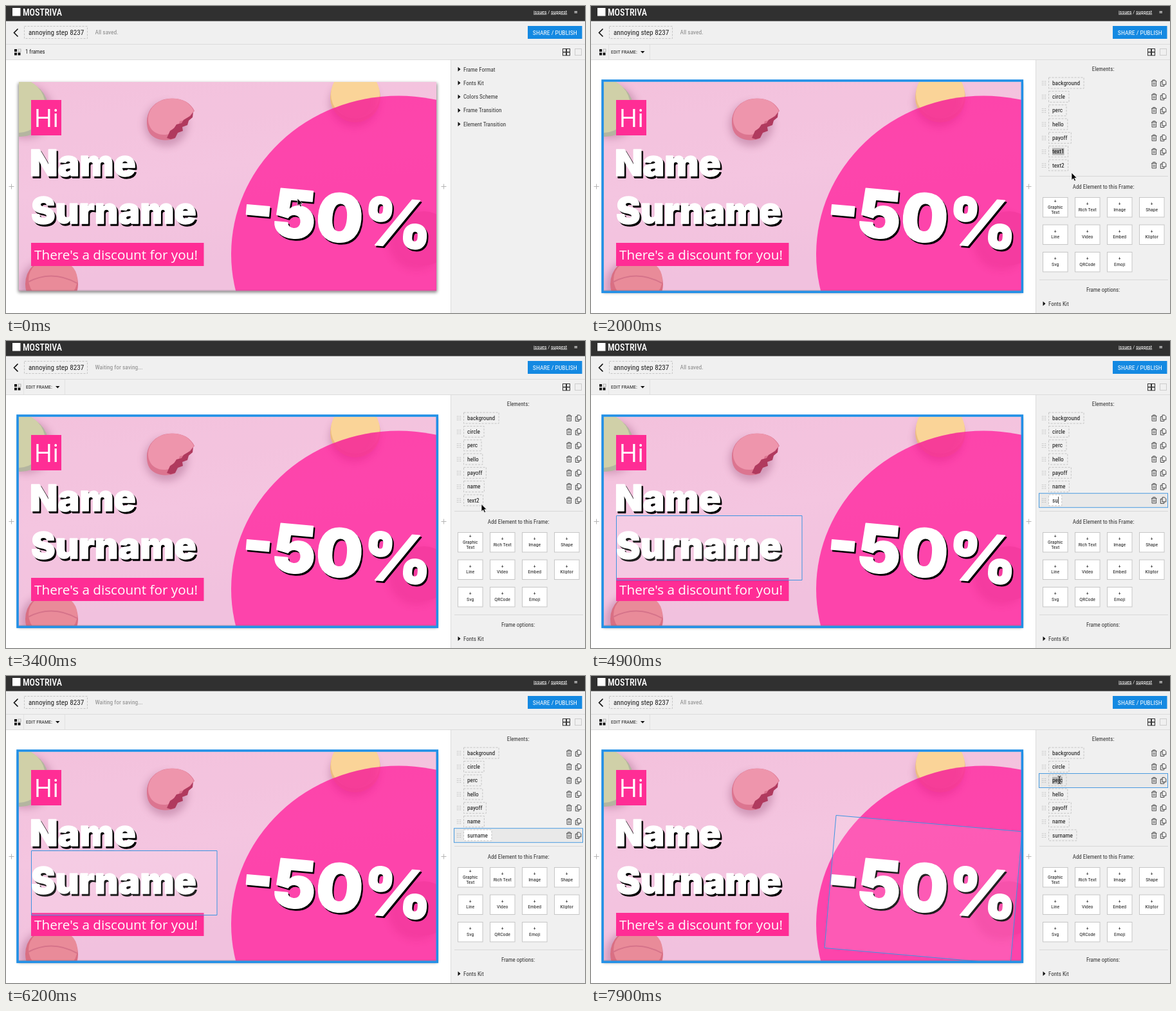
These frames come from a looping animation (900x477 px, 8 s). An HTML page:

```html
<!DOCTYPE html>
<html lang="en">
<head>
<meta charset="utf-8">
<title>Slide editor</title>
<style>
html, body { margin: 0; width: 100%; height: 100%; overflow: hidden; background: #fff; }
svg { display: block; width: 900px; height: 477px; font-family: "Roboto Condensed", Roboto, sans-serif; font-stretch: 75%; }
.slide { font-family: "Open Sans", sans-serif; font-stretch: 100%; font-weight: 500; fill: #fff; }
.bold { font-family: Inter, sans-serif; font-stretch: 100%; font-weight: 900; stroke-width: 1.5; stroke-linejoin: round; }
.dash { stroke: #c4c4c4; stroke-dasharray: 3 2; }
</style>
</head>
<body>
<svg id="stage" viewBox="0 0 900 477">
  <defs>
    <clipPath id="slideClip"><rect x="20" y="118" width="649" height="324.5"/></clipPath>
    <clipPath id="circleClip"><ellipse cx="610" cy="385.4" rx="260" ry="246"/></clipPath>
    <linearGradient id="pinkBack" x2=".3" y2="1">
      <stop offset="0" stop-color="#f8c3de"/><stop offset=".5" stop-color="#f9c8e3"/><stop offset="1" stop-color="#f4c2e0"/>
    </linearGradient>
    <filter id="blur" x="-50%" y="-50%" width="200%" height="200%"><feGaussianBlur stdDeviation="6"/></filter>
    <filter id="soft" x="-5%" y="-5%" width="110%" height="115%"><feGaussianBlur stdDeviation="2.5"/></filter>
  </defs>
  <rect width="900" height="477" fill="#fff"/>
  <g id="chrome"></g>
  <g id="slide">
    <rect x="19" y="120" width="651" height="325" fill="#000" opacity=".5" filter="url(#soft)"/>
    <rect x="20" y="118" width="649" height="324.5" fill="#fff"/>
    <g clip-path="url(#slideClip)">
      <g id="photo">
        <rect x="20" y="118" width="649" height="325" fill="url(#pinkBack)"/>
        <rect id="tint" x="20" y="118" width="649" height="325" fill="#e6bcd8" opacity=".3"/>
        <g fill="#a8688c" opacity=".45" filter="url(#blur)">
          <circle cx="31" cy="164" r="42"/><circle cx="249" cy="184" r="34"/>
          <circle cx="541" cy="151" r="38"/><circle cx="62" cy="435" r="40"/>
        </g>
        <circle cx="23" cy="160" r="43" fill="#b4b5a0"/>
        <circle cx="19" cy="155" r="42" fill="#d0d0a8"/>
        <path d="M293 163C285 146 265 140 243 146C222 154 215 174 221 193C226 207 246 212 262 206L264 198L272 192L270 186L280 182L283 174Z" fill="#dc7590"/>
        <path d="M292 163C284 146 265 140 244 146C224 153 217 172 223 186C228 199 244 203 256 198L260 190L268 186L270 179L280 177Z" fill="#ee95ac"/>
        <path d="M250 205l5-11 6-4 4-6 8-2 3-5 10-6 5-6-1 8-6 5-2 7-8 3 1 6-8 3-4 8-7 2z" fill="#b03a5e"/>
        <circle cx="543" cy="142" r="39" fill="#ecbc80"/>
        <circle cx="543" cy="137" r="38" fill="#fad498"/>
        <circle cx="71" cy="432" r="41" fill="#d96f83"/>
        <ellipse cx="73" cy="425" rx="38" ry="33" fill="#e98b99"/>
        <path d="M34 429Q72 409 111 431" fill="none" stroke="#d5738a" stroke-width="2"/>
      </g>
      <ellipse id="circle" cx="610" cy="385.4" rx="260" ry="246"/>
      <g id="veil" clip-path="url(#circleClip)">
        <circle cx="638" cy="366" r="44" filter="url(#blur)"/><circle cx="650" cy="361" r="42"/>
        <circle cx="541" cy="148" r="38" filter="url(#blur)"/>
      </g>
      <g id="words">
        <rect x="39" y="146" width="47" height="55" fill="#ff2d95"/>
        <text class="slide" x="43.5" y="188" font-size="39">Hi</text>
        <rect x="39" y="368" width="268.5" height="36" fill="#ff2d95"/>
        <text class="slide" x="44" y="393.5" font-size="20.7">There's a discount for you!</text>
      </g>
      <path id="outline" fill="#fff" fill-opacity=".12" stroke="#3b94e0"/>
      <path d="M20 442.2H669" stroke="#555" opacity=".6"/>
    </g>
    <rect id="frame" x="18" y="116" width="652.3" height="328.3" fill="none" stroke="#2290e6" stroke-width="3.6"/>
  </g>
  <g id="overview"></g>
  <g id="editor"></g>
  <g id="cursor">
    <path id="arrow" d="M0 0V11.5L2.7 9L4.6 13L6.5 12.1L4.7 8.3H8.2Z" fill="#000" stroke="#fff" stroke-width=".7"/>
    <path id="beam" d="M-2.5 -5.5Q0 -5.5 0 -3.5Q0 -5.5 2.5 -5.5M0 -4V5M-2.5 6.5Q0 6.5 0 4.5Q0 6.5 2.5 6.5" fill="none" stroke="#222"/>
  </g>
</svg>
<script>
const LOOP = 8000, STEP = 100, ROW = 21.3;
const $ = id => document.getElementById(id);

function add(parent, tag, attrs, content) {
  const node = document.createElementNS("http://www.w3.org/2000/svg", tag);
  for (const key in attrs) node.setAttribute(key, attrs[key]);
  if (content !== undefined) node.textContent = content;
  parent.appendChild(node);
  return node;
}
const rect = (p, x, y, width, height, fill, more) => add(p, "rect", { x, y, width, height, fill, ...more });
const path = (p, d, stroke = "#222", more) => add(p, "path", { d, stroke, fill: "none", ...more });
const text = (p, x, y, size, content, fill = "#222", more) =>
  add(p, "text", { x, y, "font-size": size, fill, ...more }, content);
const mid = { "text-anchor": "middle" };
const show = (node, on) => node.setAttribute("display", on ? "inline" : "none");
const folder = (p, y, name) => {
  path(p, `M702.5 ${y - 3.5}v7l4-3.5z`, "none", { fill: "#111" });
  text(p, 711, y + 3.2, 9, name, "#333");
};

// Fixed interface
const chrome = $("chrome");
rect(chrome, 0, 23, 900, 61, "#f0f0f0");
rect(chrome, 0, 0, 900, 23.5, "#303030");
rect(chrome, 691, 84, 209, 393, "#f0f0f0");
path(chrome, "M0 59.5H900M0 83.5H900M691.5 84V477", "#dcdcdc");
rect(chrome, 10, 3, 12.5, 12.5, "#fff");
text(chrome, 26, 15.3, 14, "MOSTRIVA", "#fff", { "font-weight": 500 });
const links = text(chrome, 820, 11.5, 8, "", "#fff");
const underline = { "text-decoration": "underline" };
add(links, "tspan", underline, "issues");
add(links, "tspan", {}, " / ");
add(links, "tspan", underline, "suggest");
path(chrome, "M883.5 8.5h4.5M883.5 10.5h4.5", "#fff");
path(chrome, "M18.5 35.5L12.5 41.5L18.5 47.5", "#111", { "stroke-width": 1.6 });
rect(chrome, 28.5, 31.5, 98, 19, "none", { class: "dash" });
text(chrome, 35, 45, 11.2, "annoying step 8237");
const status = text(chrome, 138.5, 44.3, 9.4, "", "#888");
rect(chrome, 811, 31, 84.5, 20, "#1489e2");
text(chrome, 853.3, 44.6, 9.7, "SHARE / PUBLISH", "#fff", mid);
for (const [x, y] of [[13, 67], [13, 72.5], [18.5, 72.5]]) rect(chrome, x, y, 4, 4, "#111");
rect(chrome, 19, 67, 4, 4, "none", { stroke: "#999", "stroke-width": .7 });
for (const [x, y] of [[865.5, 66.5], [871.5, 66.5], [865.5, 72], [871.5, 72]])
  rect(chrome, x, y, 5, 4.8, "none", { stroke: "#333" });
rect(chrome, 884.5, 66.5, 10, 10, "none", { stroke: "#ccc" });
for (const x of [8.5, 680.5]) path(chrome, `M${x - 4} 280.5h8M${x} 276.5v8`, "#b5b5b5");

// Panel with nothing selected
const overview = $("overview");
text(overview, 30, 74, 8.8, "1 frames");
["Frame Format", "Fonts Kit", "Colors Scheme", "Frame Transition", "Element Transition"]
  .forEach((name, i) => folder(overview, 98.3 + i * ROW, name));

// Panel for the selected frame
const editor = $("editor");
text(editor, 31, 74, 8, "EDIT FRAME:");
path(editor, "M77 70h6.5l-3.25 3.6z", "none", { fill: "#111" });
path(editor, "M27.5 60V83M91.5 60V83", "#e2e2e2");
text(editor, 796, 101.3, 8.9, "Elements:", "#333", mid);
const names = ["background", "circle", "perc", "hello", "payoff", "text1", "text2"];
const rows = names.map((name, i) => {
  const y = 119.6 + i * ROW, g = add(editor, "g", {});
  const hover = rect(g, 696.5, y - 10.7, 200, 22, "#e9e9e9", { stroke: "#4a9be0" });
  for (let k = 0; k < 9; k++) rect(g, 701 + k % 3 * 2.5, y - 3 + Math.floor(k / 3) * 2.8, 1, 1, "#aaa");
  const box = rect(g, 711.5, y - 8.5, 30, 17, "none", { class: "dash" });
  const mark = rect(g, 717, y - 5.5, 10, 11, "#b5b5b5");
  const label = text(g, 717, y + 3.2, 9.3, name, "#111");
  const caret = path(g, "", "#111", { "stroke-width": .8 });
  path(g, `M871 ${y - 3}h8.5M873.5 ${y - 3}v-1.7h3.5v1.7M872 ${y - 3}v7.6h6.5v-7.6M874.2 ${y - 1}v4M876.3 ${y - 1}v4`, "#444", { "stroke-width": .9 });
  path(g, `M888 ${y - 4.5}h3.5l2.3 2.3v4.7h-5.8zM888 ${y - 2}h-2.7v7h5.5v-2.5`, "#333", { "stroke-width": .9 });
  return { y, hover, box, mark, label, caret };
});
path(editor, "M697 264.5H897M697 425.5H897", "#d8d8d8");
text(editor, 796.5, 283.5, 9, "Add Element to this Frame:", "#333", mid);
["Graphic Text", "Rich Text", "Image", "Shape", "Line", "Video", "Embed", "Kliptor", "Svg", "QRCode", "Emoji"]
  .forEach((name, i) => {
    const x = 702.5 + i % 4 * 50, y = 297.5 + Math.floor(i / 4) * 42.5;
    rect(editor, x, y, 38.5, 30.5, "#fff", { stroke: "#c6c6c6" });
    const lines = i ? [name] : name.split(" "), top = y + (i ? 12.5 : 8.5);
    ["+", ...lines].forEach((line, k) => text(editor, x + 19.2, top + k * 8.7, 7.8, line, "#222", mid));
  });
text(editor, 796, 444.4, 8.9, "Frame options:", "#333", mid);
folder(editor, 462.6, "Fonts Kit");

// Headline words with a hard shadow
function headline(x, y, size, content, more) {
  for (const [d, color] of [[2.5, "#000"], [0, "#fff"]])
    text($("words"), x + d, y + d, size, content, color, { class: "bold", stroke: color, ...more });
}
headline(37, 264, 56.5, "Name");
headline(39, 338, 56.5, "Surname");
headline(364, 353, 103, "-50%", { transform: "rotate(5 364 353)" });

const outlines = [
  "M20.5 118.5H668.5V442H20.5Z", "M350 139.5H870V631.5H350Z",
  "M381 216.5l289 25.3l-18 206l-289 -25.3z", "M39.5 128.5H409V220.5H39.5Z",
  "M39.5 360.5H409V411.5H39.5Z", "M39.5 198.5H328V298.5H39.5Z", "M39.5 271.5H328V371.5H39.5Z"
];

// Cursor path: time, x, y
const moves = [
  [0, 453, 299], [700, 453, 299], [1100, 735, 214], [1300, 727, 227], [1600, 727, 227],
  [1900, 747, 259], [3300, 747, 259], [3500, 731, 248], [6400, 731, 248],
  [6600, 736, 205], [6900, 736, 171], [7300, 728, 161], [LOOP, 728, 161]
];
const between = (t, a, b) => t >= a && t < b;

function cursorAt(t) {
  const i = Math.max(1, moves.findIndex(m => m[0] > t));
  const [t0, x0, y0] = moves[i - 1], [t1, x1, y1] = moves[i];
  const k = Math.max(0, (t - t0) / (t1 - t0)), e = k * k * (3 - 2 * k);
  return [x0 + (x1 - x0) * e, y0 + (y1 - y0) * e];
}
function typed(t, before, after, times) {
  const count = times.filter(at => t >= at).length;
  return count ? after.slice(0, count) : before;
}

function render(t) {
  const selected = t >= 500;
  show(overview, !selected);
  show(editor, selected);
  show($("frame"), selected);
  status.textContent = between(t, 2800, 4000) || between(t, 5500, 6600) ? "Waiting for saving..." : "All saved.";

  // The slide reloads in stages after each rename
  const full = !between(t, 3000, 3300) && !between(t, 5700, 6000);
  const photo = full || t === 3200 || t === 5900;
  show($("photo"), photo);
  show($("tint"), full);
  show($("words"), full);
  show($("circle"), t !== 3000 && t !== 5700);
  $("circle").setAttribute("fill", full ? "#ff30a3" : "#7a6f73");
  $("circle").setAttribute("opacity", full ? .86 : photo ? .95 : 1);
  show($("veil"), photo);
  $("veil").setAttribute("fill", full ? "#d81f7a" : "#2a2226");
  $("veil").setAttribute("opacity", full ? .22 : .25);

  const [x, y] = cursorAt(t), [lagX, lagY] = cursorAt(t - STEP);
  const hovered = selected && lagX > 696 ? Math.floor((lagY - 109) / ROW) : -1;
  $("outline").setAttribute("d", outlines[hovered] || "");

  const labels = [...names];
  labels[5] = typed(t, "text1", "name", [2200, 2400, 2500, 2600]);
  labels[6] = typed(t, "text2", "surname", [4700, 4900, 5000, 5100, 5200, 5300, 5400]);
  const marked = between(t, 1600, 2200) ? 5 : between(t, 4100, 4700) ? 6 : t >= 7700 ? 2 : -1;
  const typing = between(t, 2200, 2800) ? 5 : between(t, 4700, 5500) ? 6 : -1;
  rows.forEach((row, i) => {
    row.label.textContent = labels[i];
    const width = selected ? row.label.getComputedTextLength() : 0;
    row.box.setAttribute("width", width + 11.5);
    row.box.setAttribute("fill", i === hovered && i !== marked ? "#fff" : "none");
    row.mark.setAttribute("width", width);
    row.caret.setAttribute("d", `M${717.8 + width} ${row.y - 5.5}v11`);
    show(row.hover, i === hovered);
    show(row.mark, i === marked);
    show(row.caret, i === typing);
  });

  const beam = between(t, 1300, 1700) || between(t, 3600, 4600) || t >= 7300;
  show($("cursor"), !between(t, 2200, 3300) && !between(t, 4600, 6400));
  show($("arrow"), !beam);
  show($("beam"), beam);
  $("cursor").setAttribute("transform", `translate(${x} ${y})`);
}

const start = performance.now();
function tick() {
  render(Math.floor((performance.now() - start) % LOOP / STEP) * STEP);
  requestAnimationFrame(tick);
}
tick();
</script>
</body>
</html>
```
